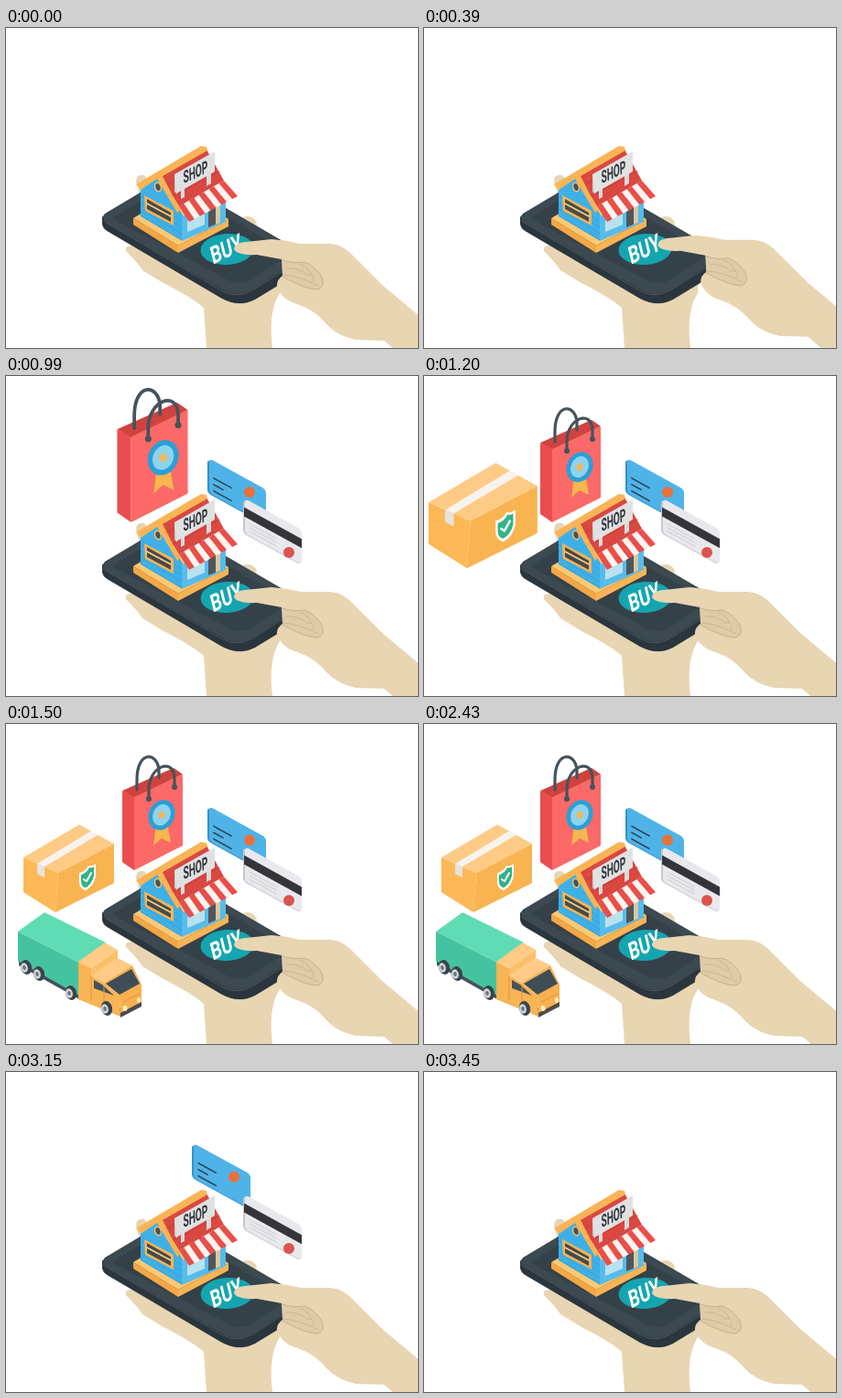
Recreate the animation shown at these times as an HTML page with a canvas. Size 450x350 px, loop 3600 ms.

```html
<!DOCTYPE html>
<html lang="en">
<head>
<meta charset="utf-8">
<title>Mobile shop</title>
<style>
html, body { margin: 0; width: 100%; height: 100%; overflow: hidden; background: #fff; }
canvas { display: block; width: 450px; height: 350px; }
</style>
</head>
<body>
<canvas id="stage" width="450" height="350"></canvas>
<script>
const ctx = document.getElementById('stage').getContext('2d');
const LOOP = 3600, STEP = 30;
const SKIN = '#e8d5b2', CREASE = '#c6b18b', ORANGE = '#f8b455';

const progress = (t, start, length) => Math.min(1, Math.max(0, (t - start) / length));
const easeOut = p => 1 - (1 - p) ** 3;
const backOut = (p, s) => p <= 0 ? 0 : 1 + (s + 1) * (p - 1) ** 3 + s * (p - 1) ** 2;

function fill(color, d) {
  ctx.fillStyle = color;
  ctx.fill(new Path2D(d));
}

function line(color, width, d) {
  ctx.strokeStyle = color;
  ctx.lineWidth = width;
  ctx.lineCap = ctx.lineJoin = 'round';
  ctx.stroke(new Path2D(d));
}

function oval(color, x, y, rx, ry = rx, angle = 0) {
  ctx.fillStyle = color;
  ctx.beginPath();
  ctx.ellipse(x, y, rx, ry, angle, 0, Math.PI * 2);
  ctx.fill();
}

function roundRect(color, x, y, w, h, r) {
  ctx.fillStyle = color;
  ctx.beginPath();
  ctx.roundRect(x, y, w, h, r);
  ctx.fill();
}

function placed(draw, matrix, alpha = 1) {
  if (alpha <= 0) return;
  ctx.save();
  ctx.globalAlpha = alpha;
  ctx.transform(...matrix);
  draw();
  ctx.restore();
}

const shifted = (draw, x, y, alpha) => placed(draw, [1, 0, 0, 1, x, y], alpha);

function scaled(draw, x, y, s) {
  if (s > 0.01) placed(draw, [s, 0, 0, s, x * (1 - s), y * (1 - s)]);
}

function label(text, size, color, matrix) {
  placed(() => {
    ctx.font = `bold ${size}px Roboto, "Liberation Sans", sans-serif`;
    ctx.textAlign = 'center';
    ctx.textBaseline = 'middle';
    ctx.fillStyle = color;
    ctx.fillText(text, 0, 0);
  }, matrix);
}

function holdingHand() {
  fill(SKIN, 'M131 244Q129 238 137 238L165 250L300 270L299 290Q286 310 291 350H219L216 306Q202 294 172 279L149 265Q145 258 131 244Z');
  fill(SKIN, 'M142 168Q142 159 151 161L160 172L146 182Z');
  fill(SKIN, 'M257 208Q267 203 273 211L275 222H260Z');
}

function phone() {
  fill('#2a353d', 'M105 206V214Q105 219 112 223L236 296Q255 306 272 297L318 269V250L250 285Z');
  fill('#3c4950', 'M108 203L170 166Q178 161 187 166L316 241Q326 248 316 256L269 286Q254 295 238 287L110 213Q103 208 108 203Z');
  fill('#354148', 'M119 206L174 173Q179 170 185 174L304 243Q310 248 303 252L267 276Q254 282 243 276L121 211Q115 208 119 206Z');
  line('#4b585f', 1, 'M106 211L237 288Q253 296 269 287L315 258');
  oval('#14a5b0', 241.5, 242, 29, 17, -0.06);
  label('BUY', 26, '#fff', [0.68, -0.33, 0.24, 0.98, 241, 243]);
}

function awning() {
  const count = 9;
  for (let i = 0; i < count; i++) {
    const a = i / count, b = (i + 1) / count;
    const top = k => `${189 + 49 * k} ${195 - 28 * k}`;
    const low = k => `${200 + 53 * k} ${212 - 28 * k}`;
    fill(i % 2 ? '#fff3ef' : '#ea4e49', `M${top(a)}L${top(b)}L${low(b)}L${low(a)}Z`);
  }
}

function shop() {
  fill('#ffc873', 'M139 208L190 178L243 209L188 238Z');
  fill('#f4a745', 'M139 208L188 238V246L139 215Z');
  fill('#f8b455', 'M188 238L243 209V217L188 246Z');
  fill('#3fb0e6', 'M147 177L168 161L193 205V233L147 206Z');
  for (let y = 184; y < 207; y += 7) line('#349fd4', 0.8, `M147 ${y}L192 ${y + 27}`);
  fill('#57bcea', 'M192 206L240 185V212L192 233Z');
  fill('#b9e2ee', 'M198 210L217 201V215L198 223Z');
  fill('#50555a', 'M221 198L233 192V213L221 218Z');
  fill('#d9c6a2', 'M229 195L234 192V213L229 215Z');
  fill(ORANGE, 'M151 183L183 200V216L152 200Z');
  fill('#4b4a45', 'M154 187L180 202V212L154 198Z');
  line('#f4d594', 1.5, 'M154 192L180 206');
  oval('#f3c06c', 166, 174, 4, 5.5, -0.3);
  oval('#44525e', 166, 174, 2.5, 4, -0.3);
  fill('#d94841', 'M168 160L218 131L238 167L189 195Z');
  line('#c83d38', 1, 'M176 171L225 144M183 184L233 157');
  fill(ORANGE, 'M142 171L213 129L219 130L220 134L171 162L190 199L187 202L165 165L147 177Z');
  awning();
  fill('#dadada', 'M191 174L195 172V185L191 187ZM219 160L224 158V170L219 173Z');
  fill('#c8cacc', 'M184 160L187 163V182L184 179Z');
  fill('#dfe1e2', 'M184 160L228 135V157L186 181Z');
  label('SHOP', 18, '#31353b', [0.56, -0.26, 0.03, 1.05, 207, 158.5]);
}

function tappingHand() {
  fill(SKIN, 'M249 242Q249 235 262 234L290 231Q306 232 322 236L354 236Q366 237 375 245L412 282L460 322V358H432L413 342L382 341Q362 337 350 324Q337 308 318 302Q301 297 296 283Q295 276 302 271L301 253L274 248Q253 249 249 242Z');
  fill('#dfccA7', 'M302 254Q313 258 326 256Q337 260 344 271Q350 281 341 286Q326 286 302 272Z');
  line(CREASE, 1, 'M302 254Q313 258 326 256Q337 260 344 271Q350 281 341 286Q326 286 302 272');
  line(CREASE, 0.8, 'M307 263Q321 262 328 270Q337 268 336 277M321 258Q332 263 333 269M303 270Q320 271 341 282');
}

function card(face, edge, details) {
  placed(() => {
    roundRect(edge, 0, 0, 63, 37, 4);
    roundRect(face, 2, -2, 62, 38, 4);
    details();
  }, [1, 0.55, 0, 1, 0, 0]);
}

function blueCard() {
  card('#4fb3e8', '#2e93cc', () => {
    line('#2d4252', 1.7, 'M7 17H26M7 24H17M7 31H26');
    placed(() => oval('#e9703a', 46, 36, 6), [1, -0.55, 0, 1, 0, 0]);
  });
}

function whiteCard() {
  card('#e9e9ed', '#c6c8ce', () => {
    roundRect('#34343a', 1, 8, 63, 10, 0);
    for (let row = 0; row < 3; row++) line('#d2d2d8', 1.4, `M7 ${23 + row * 4}H36`);
    placed(() => oval('#dc5350', 50, 58, 6), [1, -0.55, 0, 1, 0, 0]);
  });
}

function dollar() {
  for (let i = 4; i >= 0; i--) {
    label('$', 42, i ? '#3f8c35' : '#68b94a', [0.95, -0.3, 0.08, 1, -i * 0.7, i * 0.5]);
  }
}

function bag() {
  fill('#cf433f', 'M127 73L183 48L193 55L140 81Z');
  line('#46535b', 3.2, 'M143 72V61C143 29 165 30 167 50V59');
  fill('#ea4d50', 'M127 73L140 80V160L127 151Z');
  fill('#fb6968', 'M140 80L193 55V133L140 160Z');
  oval('#46535b', 156, 82, 3);
  oval('#46535b', 184, 69, 3);
  line('#46535b', 3.2, 'M156 81V72C156 46 183 36 184 59V68');
  fill('#f6b650', 'M164 110L161 133L170 125L180 130L176 106Z');
  oval('#2b9fd6', 170, 99.5, 14, 17, 0.42);
  oval('#8dd3ee', 170, 99.5, 9.5, 12, 0.42);
  let star = '';
  for (let i = 0; i < 10; i++) {
    const r = i % 2 ? 2.6 : 5.8, a = i * Math.PI / 5 - Math.PI / 2;
    star += `${i ? 'L' : 'M'}${170 + r * Math.cos(a)} ${99.5 + r * Math.sin(a)}`;
  }
  fill('#f6b650', star + 'Z');
}

function parcel() {
  fill('#fecb86', 'M19 146L80 110L118 131L57 163Z');
  fill('#fdb857', 'M19 146L57 163L54 206L19 184Z');
  fill('#f9b452', 'M57 163L118 131V174L54 206Z');
  fill('#f7f4ef', 'M34 153L93 117L101 121L42 156Z');
  fill('#e6e3df', 'M34 153L42 156V168L34 164Z');
  fill('#fff', 'M80 163Q87 161 90 155Q94 156 98 153V166Q96 177 87 182Q80 180 80 173Z');
  fill('#33b388', 'M82 165Q88 163 91 157Q94 158 96 156V166Q94 175 87 179Q82 178 82 172Z');
  line('#fff', 2, 'M85 170L88 172L93 163');
}

function wheel(x, y) {
  oval('#3a444b', x + 1, y, 6, 8, -0.25);
  oval('#d3d7da', x - 1, y + 0.5, 3.8, 5.2, -0.25);
  oval('#6b757c', x - 1, y + 0.5, 1.8, 2.5, -0.25);
}

function truck() {
  fill('#46525a', 'M14 254L80 290L126 311V320L80 301L14 264Z');
  fill('#5fdcb4', 'M13 227L42 206L109 239L80 261Z');
  fill('#45c3a0', 'M13 227L80 261V297L13 259Z');
  fill('#f8b455', 'M79 260L93 267V275L107 283L124 297L125 320L79 301Z');
  fill('#ffcb86', 'M79 260L108 239L122 247L93 267Z');
  fill('#fbbf6c', 'M93 267L122 247V257L93 276Z');
  fill('#ffcb86', 'M93 275L122 256L138 264L107 283Z');
  fill('#f9b04f', 'M107 283L138 264L148 285V308L125 320L124 297Z');
  fill('#3f4d56', 'M109 284L137 268L146 284L124 296Z');
  fill('#46535d', 'M96 280L105 285L118 297L96 289Z');
  line('#dd9440', 1, 'M93 276V302M107 286V306M128 304L146 295');
  fill('#4b4b4b', 'M125 316L148 304V309L125 321Z');
  oval('#fff0bd', 130, 311, 2.5, 3);
  oval('#fff0bd', 145, 302, 2, 3);
  wheel(21, 266);
  wheel(35, 273);
  wheel(70, 294);
  wheel(109, 311);
}

// First half of the loop brings each part in, second half takes it out.
const entering = t => t < 2000;
const pop = (t, start, length, end, endLength, s) =>
  backOut(entering(t) ? progress(t, start, length) : 1 - progress(t, end, endLength), s);
const slide = (t, start, length, end, endLength) =>
  entering(t) ? easeOut(progress(t, start, length)) : 1 - progress(t, end, endLength) ** 2;

function render(t) {
  ctx.clearRect(0, 0, 450, 350);
  holdingHand();
  phone();

  scaled(bag, 160, 160, pop(t, 840, 300, 2910, 210, 2.35));
  scaled(parcel, 89, 185, pop(t, 1065, 270, 2700, 240, 2.6));

  const blue = slide(t, 600, 420, 3030, 300);
  shifted(blueCard, 220 - 106 * (1 - blue), 91 - 76 * (1 - blue), Math.min(1, blue * 2.5));
  const white = slide(t, 480, 400, 3180, 270);
  shifted(whiteCard, 259 - 55 * (1 - white), 135 - 31 * (1 - white), Math.min(1, white * 2.5));

  shop();

  const rise = progress(t, 540, 420);
  if (rise > 0 && rise < 1) {
    const size = Math.min(1, 0.3 + rise * 1.5);
    const alpha = Math.min(1, rise * 6, (1 - rise) * 3);
    placed(dollar, [size, 0, 0, size, 245 + 28 * rise, 240 - 160 * rise], alpha);
  }

  const lift = Math.sin(Math.PI * progress(t, 0, 570)) ** 2;
  shifted(tappingHand, 9 * lift, -6 * lift);

  const drive = slide(t, 1200, 300, 2430, 240);
  if (drive > 0) shifted(truck, -155 * (1 - drive), -75 * (1 - drive));
}

function tick() {
  const t = performance.now() % LOOP;
  render(Math.floor(t / STEP) * STEP);
  requestAnimationFrame(tick);
}
tick();
</script>
</body>
</html>
```
